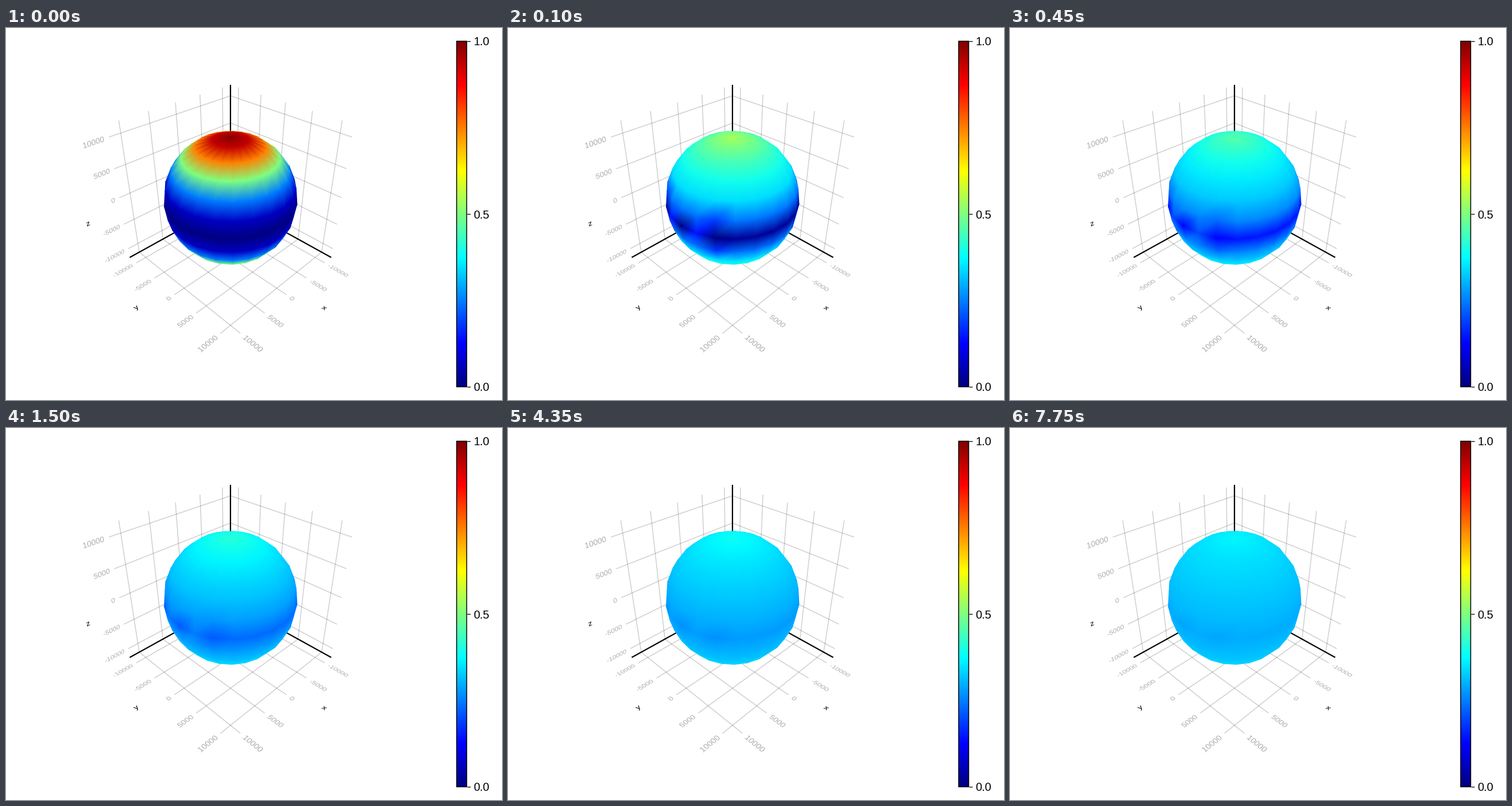
Animation, 864 px wide and 648 px high, one loop 10 s. Source, as a matplotlib script:

```python
import numpy as np
import matplotlib.pyplot as plt
from matplotlib.animation import FuncAnimation
from matplotlib.colors import LinearSegmentedColormap
from matplotlib.patches import PathPatch, Rectangle
from matplotlib.path import Path
from matplotlib.textpath import TextPath
from matplotlib.tri import Triangulation

W, H, DPI = 864, 648, 100
PX = 72 / DPI
FRAMES, INTERVAL = 200, 50
FONT = "Liberation Sans"

# Camera: distances are in ball radii, SCALE is pixels per radius at the centre
CX, CY, SCALE = 391, 295.6, 115
DIST, ELEV = 6.3, np.radians(33)
LIM = 1.19

jet = LinearSegmentedColormap.from_list("jet_linear", [
    (0, (0, 0, 0.5)), (0.125, (0, 0, 1)), (0.375, (0, 1, 1)),
    (0.625, (1, 1, 0)), (0.875, (1, 0, 0)), (1, (0.5, 0, 0))], N=1024)

fig = plt.figure(figsize=(W / DPI, H / DPI), dpi=DPI, facecolor="white")
ax = fig.add_axes([0, 0, 1, 1])
ax.axis("off")


def project(points):
    """Perspective view from the (1, 1) direction, slightly above."""
    x, y, z = np.asarray(points, float).T
    side, near = (x - y) / np.sqrt(2), (x + y) / np.sqrt(2)
    depth = DIST - near * np.cos(ELEV) - z * np.sin(ELEV)
    k = SCALE * DIST / depth
    up = z * np.cos(ELEV) - near * np.sin(ELEV)
    return np.column_stack([CX + side * k, CY - up * k])


def line(points, color=(0, 0, 0, 0.2), width=1.4, z=1):
    ax.plot(*np.transpose(points), color=color, lw=width * PX, zorder=z,
            solid_capstyle="butt")


def label(s, at, right, up, align=0.5, size=0.115, color="0.68"):
    """Text lying in a plane of the scene; align runs from 0 (left) to 1 (right)."""
    path = TextPath((0, 0), s, size=size * 100, prop={"family": FONT})
    box = path.get_extents()
    anchor = [box.x0 + align * box.width, (box.y0 + box.y1) / 2]
    flat = (path.vertices - anchor) / 100
    points = np.array(at) + flat @ np.array([right, up])
    ax.add_patch(PathPatch(Path(project(points), path.codes),
                           fc=color, ec="none", lw=0, zorder=2))


# Axis box with its ticks
X, Y, Z = np.eye(3)
GAP = LIM + 0.08
for t in np.linspace(-1, 1, 5):
    line(project([(-LIM, t, LIM), (-LIM, t, -LIM), (LIM, t, -LIM)]))
    line(project([(t, -LIM, LIM), (t, -LIM, -LIM), (t, LIM, -LIM)]))
    line(project([(-LIM, LIM, t), (-LIM, -LIM, t), (LIM, -LIM, t)]))
    s = f"{t * 10000:.0f}"
    label(s, (GAP, t, -LIM), X, -Y, align=0)
    label(s, (t, GAP, -LIM), -Y, -X, align=1)
    label(s, (-LIM, GAP, t), -Y, Z, align=1)

corner = np.full(3, -LIM)
for axis in (X, Y, Z):
    line(project([corner, corner + 2 * LIM * axis]), "black", 2.2, 1.5)

label("x", (1.74, -0.18, -LIM), X, -Y, size=0.12, color="black")
label("y", (-0.18, 1.74, -LIM), -Y, -X, size=0.12, color="black")
label("z", (-LIM, 1.75, -0.2), -Y, Z, size=0.12, color="black")

# Colour bar
LEFT, RIGHT, TOP, BOTTOM = 785, 802.5, 23, 625
ax.imshow(np.linspace(1, 0, 602)[:, None], cmap=jet, vmin=0, vmax=1,
          extent=(LEFT, RIGHT, BOTTOM, TOP), aspect="auto", zorder=2)
ax.add_patch(Rectangle((LEFT, TOP), RIGHT - LEFT, BOTTOM - TOP, fill=False,
                       ec="black", lw=1.5 * PX, snap=False, zorder=3))
for value in (0, 0.5, 1):
    y = BOTTOM + (TOP - BOTTOM) * value
    line([(RIGHT, y), (809, y)], "black", 1.3, 3)
    ax.text(814.5, y, f"{value:.1f}", family=FONT, size=20 * PX,
            ha="left", va="center_baseline")

# Ball: latitude rings by meridians, with a seam where the first and last meet
ROWS, COLS = 13, 24
EQ = ROWS // 2
lat = np.linspace(-np.pi / 2, np.pi / 2, ROWS)[:, None]
lon = np.linspace(0, 2 * np.pi, COLS)[None, :]
ball = np.stack([np.cos(lat) * np.sin(lon), np.cos(lat) * np.cos(lon),
                 np.sin(lat) + 0 * lon], axis=-1).reshape(-1, 3)
# The seam faces the viewer's left
px, py = project(ball).T

index = np.arange(ROWS * COLS).reshape(ROWS, COLS)
a, b = index[:-1, :-1].ravel(), index[:-1, 1:].ravel()
c, d = index[1:, :-1].ravel(), index[1:, 1:].ravel()
tris = np.concatenate([np.column_stack([a, b, d]), np.column_stack([a, d, c])])
p, q, r = ball[tris].transpose(1, 0, 2)
normal = np.cross(q - p, r - p)
normal *= np.sign(np.sum(normal * (p + q + r), axis=1, keepdims=True))
eye = DIST * np.array([np.cos(ELEV) / np.sqrt(2), np.cos(ELEV) / np.sqrt(2), np.sin(ELEV)])
tris = tris[np.sum(normal * (eye - p), axis=1) > 1e-9]

# Share of the equator's dip felt by each vertex; it is uneven beside the seam
share = np.zeros((ROWS, COLS))
share[EQ] = 1
share[[EQ - 1, EQ + 1]] = 0.25
seam = np.minimum(np.arange(COLS), COLS - 1 - np.arange(COLS))
share[EQ, seam == 1] = 0.45
share[EQ - 1:EQ + 2:2, seam == 2] = 0.5
spot = np.zeros((ROWS, COLS))
spot[EQ, (seam == 0) | (seam == 2)] = 1


def field(n):
    if n == 0:
        return np.sin(lat) ** 2 + 0 * lon
    base = 0.305 - 0.065 * np.exp(-n / 85)
    rise = 0.35 * n ** -0.2 * np.exp(-n / 300)
    dip = 0.3 / (1 + n / 6) * np.exp(-n / 60)
    value = base + rise * np.abs(lat) / (np.pi / 2) - dip * share
    return np.clip(value - 0.02 * np.exp(-n / 150) * spot, 0, 1)


mesh = ax.tripcolor(Triangulation(px, py, tris), field(0).ravel(), cmap=jet,
                    vmin=0, vmax=1, shading="gouraud", zorder=4)

ax.set_xlim(0, W)
ax.set_ylim(H, 0)


def update(n):
    mesh.set_array(field(n).ravel())
    return (mesh,)


anim = FuncAnimation(fig, update, frames=FRAMES, interval=INTERVAL,
                     repeat=True, repeat_delay=0)
plt.show()
```
